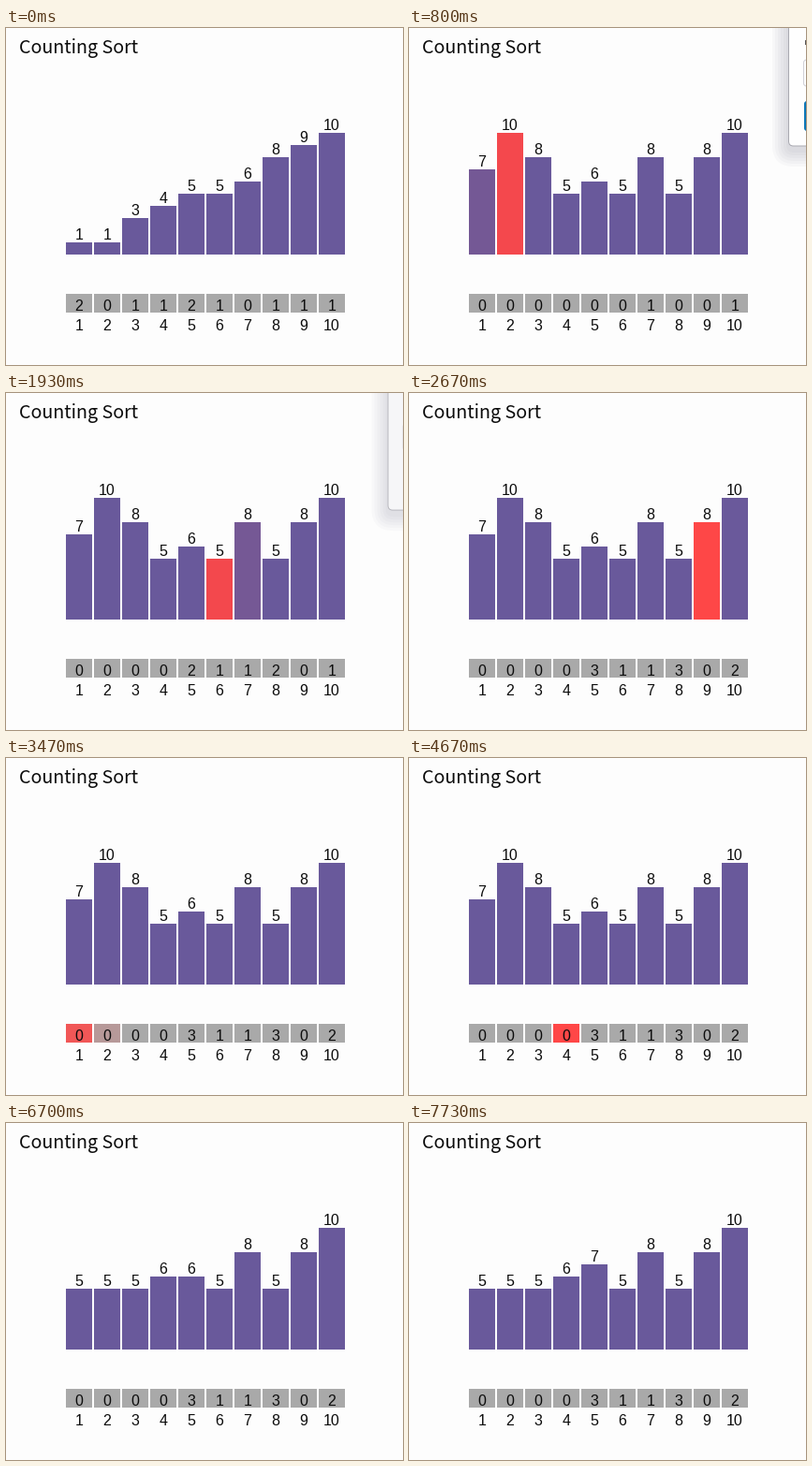
These frames come from a looping animation (424x360 px, 8000 ms). A matplotlib script:

```python
import numpy as np
import matplotlib.pyplot as plt
from matplotlib.animation import FuncAnimation
from matplotlib.colors import to_rgb
from matplotlib.patches import FancyBboxPatch, Rectangle
from matplotlib.transforms import Affine2D

W, H, DPI = 424, 360, 100
LOOP, STEP = 8000, 20
FADE = 250

BACK = "#fdfdfd"
BAR = np.array(to_rgb("#69599b"))
CELL = np.array(to_rgb("#a9a9a9"))
RED = np.array(to_rgb("#ff4747"))

SORTED = [1, 1, 3, 4, 5, 5, 6, 8, 9, 10]
VALUES = [7, 10, 8, 5, 6, 5, 8, 5, 8, 10]

RESET = 400
COUNT_AT = [380 + 253 * k for k in range(11)]
# (on, off) times of each bucket visited
CELL_SPANS = [(2910, 3425), (3425, 3945), (3945, 4430), (4430, 4950),
              (4950, 5455), (5935, 6450), (6970, 7470)]
# (time, first slot, values written)
WRITES = [(RESET - STEP, 0, VALUES), (5455, 0, [5, 5, 5]),
          (6450, 3, [6]), (7470, 4, [7])]
PANEL_CLOSE, PANEL_FADE = 1860, 260

# CSS "ease" curve, sampled from its Bezier form
u = np.linspace(0, 1, 60)
EASE_X = 0.75 * u * (1 - u) ** 2 + 0.75 * u ** 2 * (1 - u) + u ** 3
EASE_Y = 0.3 * u * (1 - u) ** 2 + 3 * u ** 2 * (1 - u) + u ** 3


def ease(t):
    return np.interp(t, EASE_X, EASE_Y)


def glow(t, on, off):
    return ease((t - on) / FADE) - ease((t - off) / FADE)


def mix(a, b, amount):
    return tuple(np.clip(a + (b - a) * amount, 0, 1))


fig = plt.figure(figsize=(W / DPI, H / DPI), dpi=DPI, facecolor=BACK)
ax = fig.add_axes([0, 0, 1, 1])
ax.set_xlim(0, W)
ax.set_ylim(H, 0)
ax.axis("off")


def label(x, y, text, size=16, ha="center", family="Liberation Sans"):
    return ax.text(x, y, text, fontsize=size * 72 / DPI, ha=ha, va="baseline",
                   color="#0c0c0c", family=family)


def box(x, y, w, h, color):
    return ax.add_patch(Rectangle((x, y), w, h, facecolor=color, linewidth=0))


label(13.5, 27, "Counting Sort", 19.7, "left", "Noto Sans CJK JP")
bars, tops, cells, counts = [], [], [], []
for k in range(10):
    x = 64 + 30 * k
    bars.append(box(x, 242, 28, 0, BAR))
    tops.append(label(x + 14, 0, ""))
    cells.append(box(x, 284, 28, 20, CELL))
    counts.append(label(x + 14, 302, ""))
    label(x + 14, 323, str(k + 1))

# Dialog corner at the top right: (patch, full alpha)
panel = []


def rounded(x, bottom, radius, color, alpha, edge="none", top=-60):
    patch = FancyBboxPatch((x + radius, top), 120, bottom - top - radius,
                           boxstyle=f"round,pad={radius}", facecolor=color,
                           edgecolor=edge, linewidth=0.7)
    panel.append((ax.add_patch(patch), alpha))


for reach in range(18, 0, -3):
    rounded(406 - reach, 130 + reach, 5 + reach, "#77778c", 0.045)
rounded(405.5, 126, 5, "#fefefe", 1, "#a8a8b0")
rounded(421.5, 62, 3, "#fefefe", 1, "#cfcfd6", top=37)
rounded(422, 110, 3, "#0a76b8", 1, top=81)
panel.append((box(422.5, 13, 2, 5, "#555555"), 1))


def draw_panel(t):
    gone = np.clip((t - PANEL_CLOSE) / PANEL_FADE, 0, 1)
    shift = Affine2D().translate(11 * gone, -4 * gone) + ax.transData
    for patch, alpha in panel:
        patch.set_visible(RESET <= t and gone < 1)
        patch.set_alpha(alpha * (1 - gone))
        patch.set_transform(shift)


def bar_state(t):
    """Numbers switch at once; heights ease towards them."""
    values, heights = list(SORTED), np.array(SORTED, float)
    for when, slot, new in WRITES:
        if t > when:
            part = slice(slot, slot + len(new))
            values[part] = new
            heights[part] += (new - heights[part]) * ease((t - when) / FADE)
    return values, 13 * heights


def tally(t):
    if t < RESET:
        return [SORTED.count(n) for n in range(1, 11)]
    seen = [v for v, when in zip(VALUES, COUNT_AT) if t >= when]
    return [seen.count(n) for n in range(1, 11)]


def update(frame):
    t = frame * STEP
    values, heights = bar_state(t)
    found = tally(t)
    for k in range(10):
        heat = glow(t, COUNT_AT[k], COUNT_AT[k + 1])
        bars[k].set_y(242 - heights[k])
        bars[k].set_height(heights[k])
        bars[k].set_facecolor(mix(BAR, RED, heat))
        tops[k].set_text(str(values[k]))
        tops[k].set_y(239 - heights[k])
        counts[k].set_text(str(found[k]))
        heat = glow(t, *CELL_SPANS[k]) if k < len(CELL_SPANS) else 0
        cells[k].set_facecolor(mix(CELL, RED, heat))
    draw_panel(t)
    return bars + tops + cells + counts


anim = FuncAnimation(fig, update, frames=LOOP // STEP, interval=STEP,
                     repeat=True, repeat_delay=0, blit=False)
plt.show()
```
